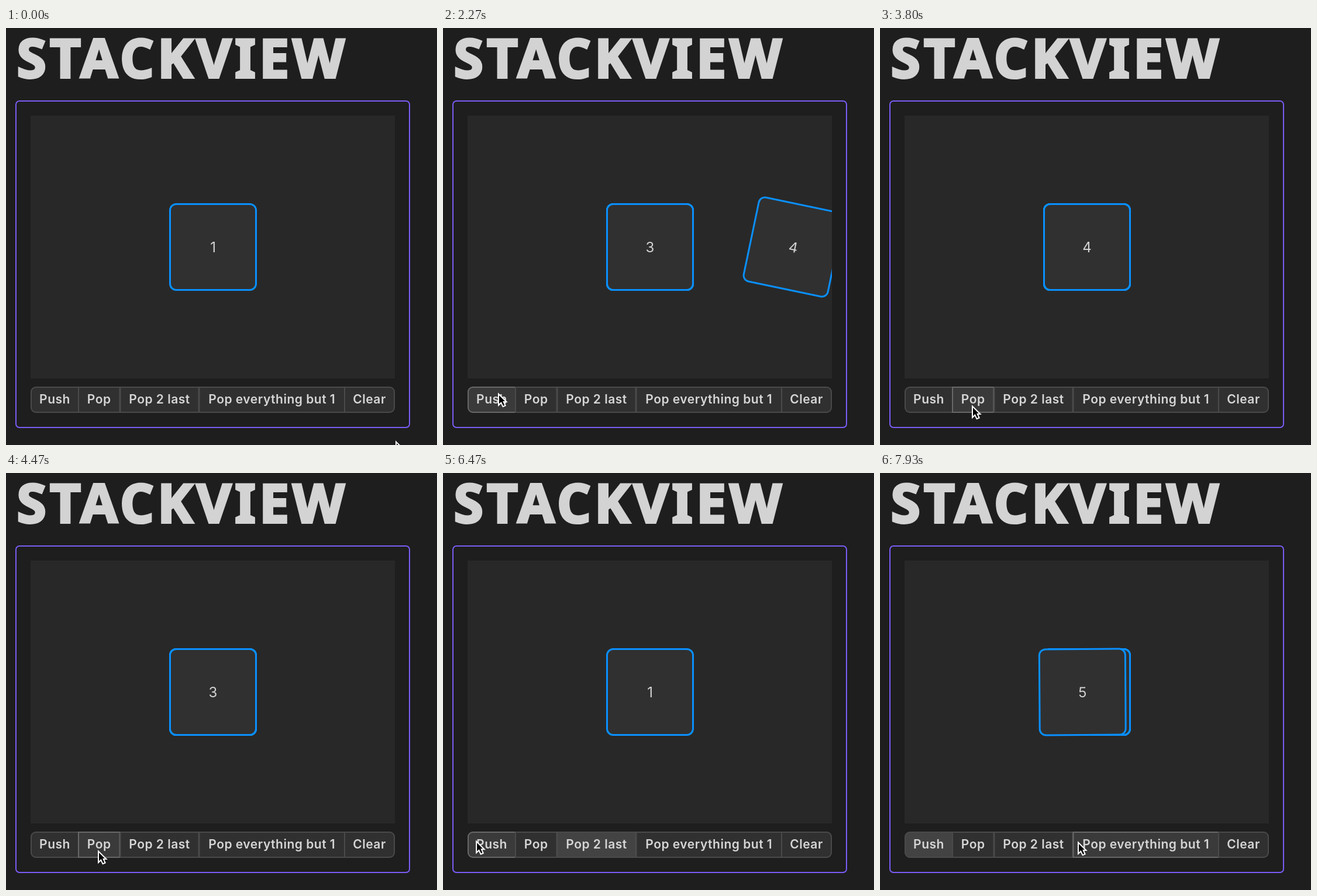
Animation of 737x714 px, one loop 8 s. Source, as an HTML page:

```html
<!DOCTYPE html>
<html lang="en">
<head>
<meta charset="utf-8">
<title>StackView</title>
<style>
  html, body { margin: 0; width: 100%; height: 100%; overflow: hidden; background: #1e1e1e; }
  svg { display: block; width: 737px; height: 714px; cursor: default; }
  .title { font: 900 91.5px "Noto Sans", sans-serif; letter-spacing: 6px; fill: #d3d3d3; stroke: #d3d3d3; stroke-width: 4; }
  .frame { fill: none; stroke: #7c5cf6; stroke-width: 2; }
  .stage { fill: #282828; }
  .card rect { fill: #303030; stroke: #0a90ff; stroke-width: 3; }
  .card text { font: 400 24px Inter, sans-serif; fill: #d3d3d3; text-anchor: middle; }
  .button path { fill: #303030; stroke: #4a4a4a; stroke-width: 2; }
  .button.focus path { fill: #434343; }
  .button.hover path { fill: #3a3a3a; stroke: #686868; }
  .button.active path { fill: #303030; }
  .button text { font: 600 21px Inter, sans-serif; letter-spacing: .5px; fill: #d6d6d6; text-anchor: middle; }
  .cursor { fill: #000; stroke: #fff; stroke-width: 4; paint-order: stroke; }
</style>
</head>
<body>
<svg viewBox="0 0 737 714">
  <clipPath id="clip"><rect x="42" y="150" width="623" height="450"/></clipPath>
  <text class="title" x="18.5" y="85">STACKVIEW</text>
  <rect class="frame" x="17" y="125" width="673" height="559" rx="6"/>
  <rect class="stage" x="42" y="150" width="623" height="450"/>
  <g id="cards" clip-path="url(#clip)"></g>
  <g id="buttons"></g>
  <path id="cursor" class="cursor" d="M2 5V19.5L5.6 16 9 23 11.3 22 8.2 15H12Z"/>
</svg>
<script>
const LOOP = 8000, SLIDE = 400, PRESS = 60;
const CENTER = { x: 354, y: 375 }, STAGE = { width: 623, height: 450 };
const PUSH = 0, POP = 1, POP_TWO = 2;

const BUTTONS = [
  { label: 'Push', left: 43, right: 124 },
  { label: 'Pop', left: 124, right: 194.5 },
  { label: 'Pop 2 last', left: 195.5, right: 329.5 },
  { label: 'Pop everything but 1', left: 330.5, right: 579 },
  { label: 'Clear', left: 579, right: 664 },
];

// Evenly spaced clicks on one button.
const RUNS = [
  { button: PUSH, first: 1203, gap: 501.5, count: 4 },
  { button: POP, first: 3385, gap: 625, count: 2 },
  { button: POP_TWO, first: 5312, gap: 0, count: 1 },
  { button: PUSH, first: 6626, gap: 314, count: 4 },
];

// Pointer trips; bow shifts the middle control point of the path.
const HOME = { x: 666, y: 706 };
const TRIPS = [
  { start: 10, end: 800, x: 94, y: 624, bow: [0, -186] },
  { start: 2940, end: 3230, x: 157, y: 645 },
  { start: 4650, end: 4810, x: 226, y: 634 },
  { start: 6010, end: 6140, x: 87, y: 602 },
  { start: 6300, end: 6510, x: 69, y: 631, bow: [-88, 0] },
  { start: 7620, end: 7930, x: 338, y: 630 },
];

const byId = id => document.getElementById(id);
const cursor = byId('cursor');
const progress = (now, start, span) => Math.min(1, Math.max(0, (now - start) / span));
const inBack = t => 2.70158 * t ** 3 - 1.70158 * t ** 2;
const smooth = t => t * t * (3 - 2 * t);
const bezier = (a, b, c, t) => a * (1 - t) ** 2 + 2 * b * t * (1 - t) + c * t * t;

function add(parent, tag, attrs, text) {
  const node = document.createElementNS('http://www.w3.org/2000/svg', tag);
  for (const name in attrs) node.setAttribute(name, attrs[name]);
  if (text !== undefined) node.textContent = text;
  return parent.appendChild(node);
}

function outline(left, right, l, r) {
  const top = 615, bottom = 658;
  return `M${left + l} ${top}H${right - r}a${r} ${r} 0 0 1 ${r} ${r}V${bottom - r}` +
    `a${r} ${r} 0 0 1 ${-r} ${r}H${left + l}a${l} ${l} 0 0 1 ${-l} ${-l}V${top + l}a${l} ${l} 0 0 1 ${l} ${-l}Z`;
}

function makeCard(number, pushAt) {
  const node = add(byId('cards'), 'g', { class: 'card' });
  add(node, 'rect', { x: -73.5, y: -73.5, width: 147, height: 147, rx: 10.5 });
  add(node, 'text', { x: 0, y: 9 }, number);
  return { node, pushAt, popAt: Infinity };
}

// Replay the clicks on a stack to learn when each card comes and goes.
function makeCards(clicks) {
  const cards = [makeCard(1, -LOOP)], stack = [...cards];
  for (const { button, time } of clicks) {
    if (button === PUSH) {
      const card = makeCard(stack.length + 1, time);
      cards.push(card);
      stack.push(card);
    } else {
      for (const card of stack.splice(-button)) card.popAt = time;
    }
  }
  return cards;
}

const clicks = RUNS.flatMap(({ button, first, gap, count }) =>
  Array.from({ length: count }, (_, i) => ({ button, time: first + gap * i })));
const cards = makeCards(clicks);

const buttons = BUTTONS.map(({ label, left, right }, i) => {
  const node = add(byId('buttons'), 'g', { class: 'button' });
  add(node, 'path', { d: outline(left, right, i === 0 ? 8 : 0, i === BUTTONS.length - 1 ? 8 : 0) });
  add(node, 'text', { x: (left + right) / 2, y: 643 }, label);
  return node;
});

function pointerAt(now) {
  let at = HOME;
  for (const { start, end, x, y, bow = [0, 0] } of TRIPS) {
    if (now < start) break;
    const t = smooth(progress(now, start, end - start));
    at = {
      x: bezier(at.x, (at.x + x) / 2 + bow[0], x, t),
      y: bezier(at.y, (at.y + y) / 2 + bow[1], y, t),
    };
  }
  return at;
}

function drawCard({ node, pushAt, popAt }, now) {
  const shown = now >= pushAt && now < popAt + SLIDE;
  node.style.display = shown ? '' : 'none';
  if (!shown) return;
  const enter = inBack(1 - progress(now, pushAt, SLIDE));
  const leave = inBack(progress(now, popAt, SLIDE));
  const x = CENTER.x + STAGE.width * enter;
  const y = CENTER.y + STAGE.height * leave;
  const angle = 30 * enter - 40 * leave;
  node.setAttribute('transform', `translate(${x} ${y}) rotate(${angle}) scale(${1 - leave})`);
}

function drawButtons(now, { x, y }) {
  const click = clicks.filter(({ time }) => time - PRESS <= now).pop();
  BUTTONS.forEach(({ left, right }, i) => {
    const hover = x >= left && x < right && y >= 614 && y < 659;
    const focus = click?.button === i;
    const state = buttons[i].classList;
    state.toggle('hover', hover);
    state.toggle('focus', focus);
    state.toggle('active', hover && focus && now < click.time);
  });
}

function draw() {
  const now = performance.now() % LOOP;
  const pointer = pointerAt(now);
  cards.forEach(card => drawCard(card, now));
  drawButtons(now, pointer);
  cursor.setAttribute('transform', `translate(${pointer.x} ${pointer.y})`);
  requestAnimationFrame(draw);
}
draw();
</script>
</body>
</html>
```
